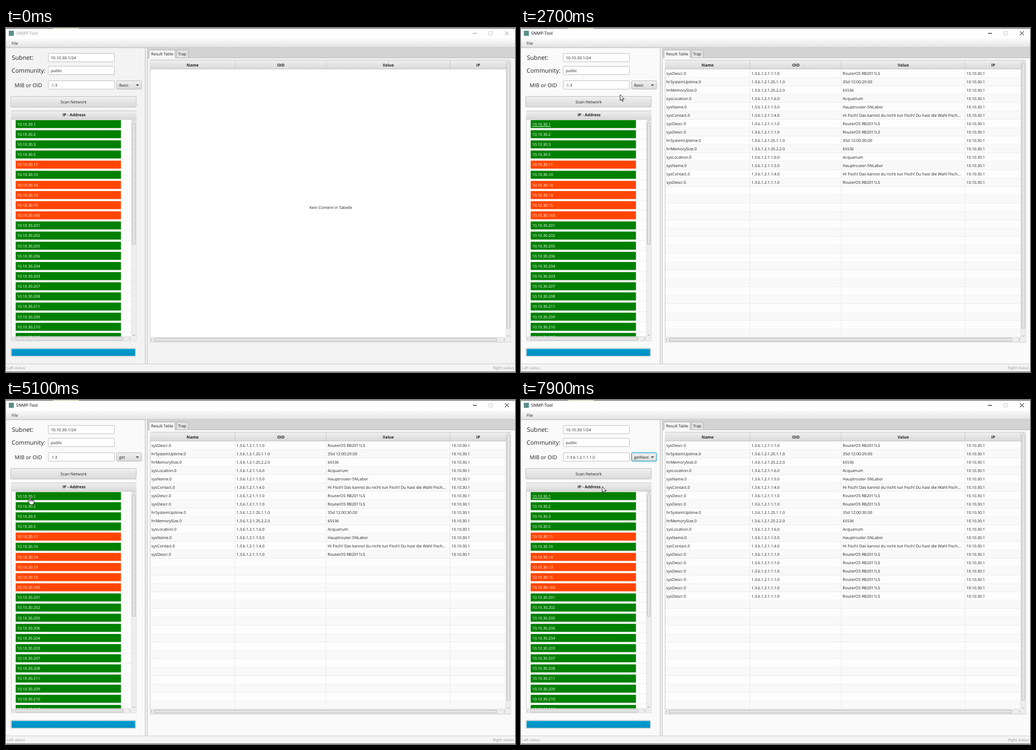
Recreate the animation shown at these times as an HTML page. Size 909 by 616 pixels, loop 8000 ms.

```html
<!DOCTYPE html>
<html lang="en">
<head>
<meta charset="utf-8">
<title>SNMP-Tool</title>
<style>
html, body { margin: 0; width: 100%; height: 100%; overflow: hidden; background: #fff; }
svg { display: block; font-family: "Open Sans", "Noto Sans", sans-serif; text-rendering: geometricPrecision; }
</style>
</head>
<body>
<svg id="stage" width="909" height="616" viewBox="0 0 909 616">
<defs>
  <linearGradient id="btn" x2="0" y2="1"><stop stop-color="#f0f0f0"/><stop offset="1" stop-color="#dadada"/></linearGradient>
  <linearGradient id="menu" x2="0" y2="1"><stop stop-color="#fafafa"/><stop offset="1" stop-color="#e3e3e3"/></linearGradient>
  <linearGradient id="bar" x2="0" y2="1"><stop stop-color="#009bcf"/><stop offset="1" stop-color="#0090c2"/></linearGradient>
  <filter id="shadow" x="-20%" y="-20%" width="140%" height="140%"><feDropShadow dx="0" dy="2" stdDeviation="2.5" flood-opacity=".35"/></filter>
</defs>
<g id="scene"></g>
</svg>
<script>
const LOOP = 8000, STEP = 100;
const BLUE = '#0096c9', GREEN = '#008000', RED = '#ff4500', EDGE = '#c3c3c3';
const hosts = '1 2 3 5 11! 10 14! 13! 15! 165! 201 202 205 206 204 203 207 208 211 209 210 212'.split(' '); // ! = offline
const columns = [257, 409, 572, 793, 893];
const modes = ['Basic', 'get', 'getNext'];

const descr = ['sysDescr.0', '1.3.6.1.2.1.1.1.0', 'RouterOS RB2011LS'];
const batch = sec => [
  descr,
  ['hrSystemUptime.0', '1.3.6.1.2.1.25.1.1.0', `35d 12:00:${sec}.00`],
  ['hrMemorySize.0', '1.3.6.1.2.1.25.2.2.0', '65536'],
  ['sysLocation.0', '1.3.6.1.2.1.1.6.0', 'Acquarium'],
  ['sysName.0', '1.3.6.1.2.1.1.5.0', 'Hauptrouter-SNLabor'],
  ['sysContact.0', '1.3.6.1.2.1.1.4.0', 'Hi Fisch! Das kannst du nicht tun Fisch! Du hast die Wahl Fisch...'],
  descr
];

// Interface state at time t
function stateAt(t) {
  const during = (from, to) => t >= from && t < to;
  const pressed = during(2200, 2400) || during(5100, 5200) || during(5500, 6000);
  const mode = t < 3900 ? 0 : t < 7700 ? 1 : 2;
  const gets = [5200, 5700, 5800, 6000, 6200].filter(at => t >= at);
  return {
    active: t >= 1200,
    underline: t >= 1000 && !pressed,
    mode,
    hot: t < 3700 ? 0 : t < 7200 ? 1 : 2,
    focus: during(3500, 5100) || t >= 6800,
    popup: during(3500, 3900) || during(6900, 7700),
    oid: t < 6000 ? '.1.3' : '.' + descr[1],
    rows: [...(t < 1400 ? [] : batch(29)), ...(t < 2400 ? [] : batch(30)), ...gets.map(() => descr)]
  };
}

// Pointer moves: from, to, x, y
const moves = [
  [200, 800, 14, 172], [800, 1000, 45, 172], [2300, 3100, 221, 102], [3200, 3700, 228, 121],
  [3900, 4900, 43, 174], [6400, 6800, 216, 104], [6900, 7200, 210, 121], [7600, 7900, 145, 155]
];

function pointer(t) {
  let x = 225, y = t < 200 ? -20 : 0;
  for (const [from, to, toX, toY] of moves) {
    const k = Math.min(1, Math.max(0, (t - from) / (to - from))), ease = k * (2 - k);
    x += (toX - x) * ease;
    y += (toY - y) * ease;
  }
  return [x, y];
}

const rect = (x, y, w, h, fill, stroke = 'none', r = 0) =>
  `<rect x="${x}" y="${y}" width="${w}" height="${h}" fill="${fill}" stroke="${stroke}" rx="${r}"/>`;
const line = (d, stroke, w = 1) => `<path d="${d}" fill="none" stroke="${stroke}" stroke-width="${w}"/>`;
function text(s, x, y, { size = /^[\d.]+$/.test(s) ? 6.88 : 7.13, fill = '#222', extra = '' } = {}) {
  return `<text x="${x}" y="${y}" font-size="${size}" fill="${fill}" ${extra}>${s}</text>`;
}
const middle = 'text-anchor="middle"';
const heading = (s, x, y) => text(s, x, y, { size: 7.15, extra: middle + ' font-weight="700"' });
const field = (y, s) => rect(75.5, y + .5, 118, 15, '#fff', '#c4c4c4', 1.5) + text(s, 80, y + 10.8);
const thumb = (x, y, w, h) => rect(x, y, w, h, '#e4e4e4', '#bdbdbd', 1.5);
const chevron = (x, y, angle) =>
  `<path transform="translate(${x} ${y}) rotate(${angle})" d="M-1-2L1 0L-1 2" fill="none" stroke="#8a8a8a" stroke-width=".8"/>`;

// Scroll bars along the right and bottom edge of a box
function scrollBars(x, y, right, bottom, tall, wide) {
  return rect(right - 8.5, y, 8.5, bottom - y, '#eee') + rect(x, bottom - 8, right - x - 8.5, 8, '#eee')
    + line(`M${right - 8.5} ${y}V${bottom - 8}H${x}`, '#d4d4d4', .7)
    + thumb(right - 7, y + 5.5, 5.5, tall) + thumb(x + 7, bottom - 6.5, wide, 5)
    + chevron(right - 4.2, y + 2, -90) + chevron(right - 4.2, bottom - 10.5, 90)
    + chevron(x + 2.5, bottom - 4, 180) + chevron(right - 11.5, bottom - 4, 0);
}

function titleBar(active) {
  const ink = active ? '#000' : '#999';
  return rect(0, 0, 909, 19, '#fff') + rect(0, 0, 909, 1, '#555') + rect(84, 0, 46, 1, '#c9c68f')
    + rect(5, 5, 9, 9, '#5b8f8a')
    + text('SNMP-Tool', 18, 12.4, { size: 7.7, fill: ink })
    + line('M834 9.5H841', ink) + rect(862.5, 6.5, 6, 6, 'none', '#ccc')
    + line('M891 6L898 13M898 6L891 13', ink)
    + rect(0, 19, 909, 16, 'url(#menu)') + rect(0, 34.5, 909, 1.2, '#bdbdbd')
    + text('File', 10, 30);
}

function hostList(underline, paper) {
  let s = rect(9.5, 148.5, 223, 412, paper, '#cdcdcd') + rect(9, 148, 224, 15, 'url(#btn)')
    + line('M9 148.5H233M9 163.5H233', '#c8c8c8') + heading('IP - Address', 121.5, 158.4);
  s += '<svg x="0" y="163" width="224" height="390" viewBox="0 163 224 390">';
  hosts.forEach((host, i) => {
    const y = 163.2 + i * 18.15;
    s += rect(10, y + 17.5, 214, .7, '#e8e8e8')
      + rect(17.3, y + 1.7, 188, 14.3, host.endsWith('!') ? RED : GREEN)
      + text('10.10.30.' + parseInt(host), 20, y + 11.5, { fill: '#fff' });
  });
  if (underline) s += rect(20, 176, 33, .8, '#fff');
  return s + '</svg>' + scrollBars(9.5, 164, 232.5, 560.5, 218, 193);
}

function resultTable(rows, paper) {
  let s = rect(257.5, 57.5, 644, 505, paper, '#cdcdcd') + rect(257, 57, 636, 16, 'url(#btn)')
    + line('M257 57.5H893M257 73.5H893', '#c8c8c8');
  ['Name', 'OID', 'Value', 'IP'].forEach((name, c) => {
    s += heading(name, (columns[c] + columns[c + 1]) / 2 + .3, 69.2) + rect(columns[c + 1] - .5, 58, 1, 15, '#cbcbcb');
  });
  if (rows.length) {
    for (let i = 0; i < 32; i++) {
      const y = 73.5 + i * 15;
      if (i % 2) s += rect(258, y, 635, 15, '#f9f9f9');
      s += rect(258, y + 14.6, 635, .7, '#e8e8e8');
    }
    columns.slice(1).forEach(x => s += rect(x - .5, 74, .8, 479, '#e6e6e6'));
    rows.forEach((row, i) =>
      [...row, '10.10.30.1'].forEach((v, c) => s += text(v, columns[c] + 2.6, 83.7 + i * 15)));
  } else s += text('Kein Content in Tabelle', 580, 323.5, { extra: middle });
  return s + scrollBars(257.5, 56.5, 901.5, 562, 476, 612);
}

function popup(chosen, hot) {
  const rowHeight = 15.8, top = 93 - chosen * rowHeight;
  let s = `<g filter="url(#shadow)">${rect(198.5, top, 47, 50.5, '#fdfdfd', '#c8c8c8')}</g>`;
  modes.forEach((name, i) => {
    const y = top + 1.5 + i * rowHeight, ink = i === hot ? '#fff' : '#222';
    if (i === hot) s += rect(199, y, 46, rowHeight, BLUE);
    if (i === chosen) s += line(`M203.5 ${y + 8.2}l1.8 2.4l3.3-5.9`, ink, 1.2);
    s += text(name, 211, y + 10.5, { fill: ink });
  });
  return s;
}

function cursor(t) {
  const [x, y] = pointer(t), overLink = x < 206 && y > 165;
  const shape = overLink
    ? 'M-1 1Q0-1 1 1V5L5 5.6Q7 6 7 8V10Q6.6 12 5.4 13.2H0Q-2 10-4 7.6Q-4 6-2.4 6.6L-1 8Z'
    : 'M0 0V10.4L2.4 8.2L4 12L5.7 11.3L4.1 7.6H7.4Z';
  const fingers = overLink ? '<path d="M1 5V7.5M3 5.4V7.7M5 5.7V8" stroke-width=".6"/>' : '';
  return `<g transform="translate(${x} ${y})" fill="#fff" stroke="#000" stroke-width=".8" stroke-linejoin="round">
    <path d="${shape}"/>${fingers}</g>`;
}

function draw(t) {
  const ui = stateAt(t), base = ui.active ? '#fafafa' : '#f3f3f3', paper = ui.active ? '#fdfdfd' : '#fff';
  return rect(0, 0, 909, 616, base) + titleBar(ui.active)
    + text('Subnet:', 10.5, 57, { size: 10.8 }) + text('Community:', 10, 80, { size: 10.6 })
    + text('MIB or OID', 15.5, 105.8, { size: 9.5 })
    + field(45, '10.10.30.1/24') + field(68, 'public') + field(94, ui.oid)
    + rect(197.5, 94.5, 44.5, 15, 'url(#btn)', ui.focus ? BLUE : '#bdbdbd', 1.5)
    + text(modes[ui.mode], 202, 104.8)
    + '<path d="M232 101h5.5l-2.75 3Z" fill="#444"/>'
    + rect(8.5, 122.5, 224, 19, 'url(#btn)', EDGE, 1.5) + text('Scan Network', 120.7, 135, { size: 7.3, extra: middle })
    + hostList(ui.underline, paper)
    + rect(8.5, 573.5, 223, 14.5, '#eee', '#c8c8c8', 1) + rect(10, 574.7, 220.5, 12.4, 'url(#bar)')
    + rect(248, 36, 5, 565, '#eee') + line('M248.5 36V601M252.5 36V601', '#c4c4c4')
    + rect(253, 36, 656, 18, '#d3d3d3') + line('M253 53.5H909', '#bcbcbc')
    + rect(255.5, 39.5, 46.5, 15, '#f5f5f5', '#b5b5b5', 1) + rect(256, 53, 46, 2, base)
    + rect(304.5, 39.5, 21, 14, '#e3e3e3', '#b5b5b5', 1)
    + text('Result Table', 259, 49.4) + text('Trap', 307.3, 49.4)
    + resultTable(ui.rows, paper)
    + rect(0, 601, 909, 15, '#f4f4f4') + rect(0, 601, 909, 1, '#cfcfcf') + rect(0, 615, 909, 1, '#777')
    + text('Left status', 2, 611, { size: 6.6, fill: '#999' })
    + text('Right status', 907, 611, { size: 6.8, fill: '#999', extra: 'text-anchor="end"' })
    + (ui.popup ? popup(ui.mode, ui.hot) : '') + cursor(t);
}

const scene = document.getElementById('scene');
const start = performance.now();
let shown = -1;
function tick(now) {
  const t = Math.floor(Math.max(0, now - start) % LOOP / STEP) * STEP;
  if (t !== shown) scene.innerHTML = draw(shown = t);
  requestAnimationFrame(tick);
}
tick(start);
</script>
</body>
</html>
```
